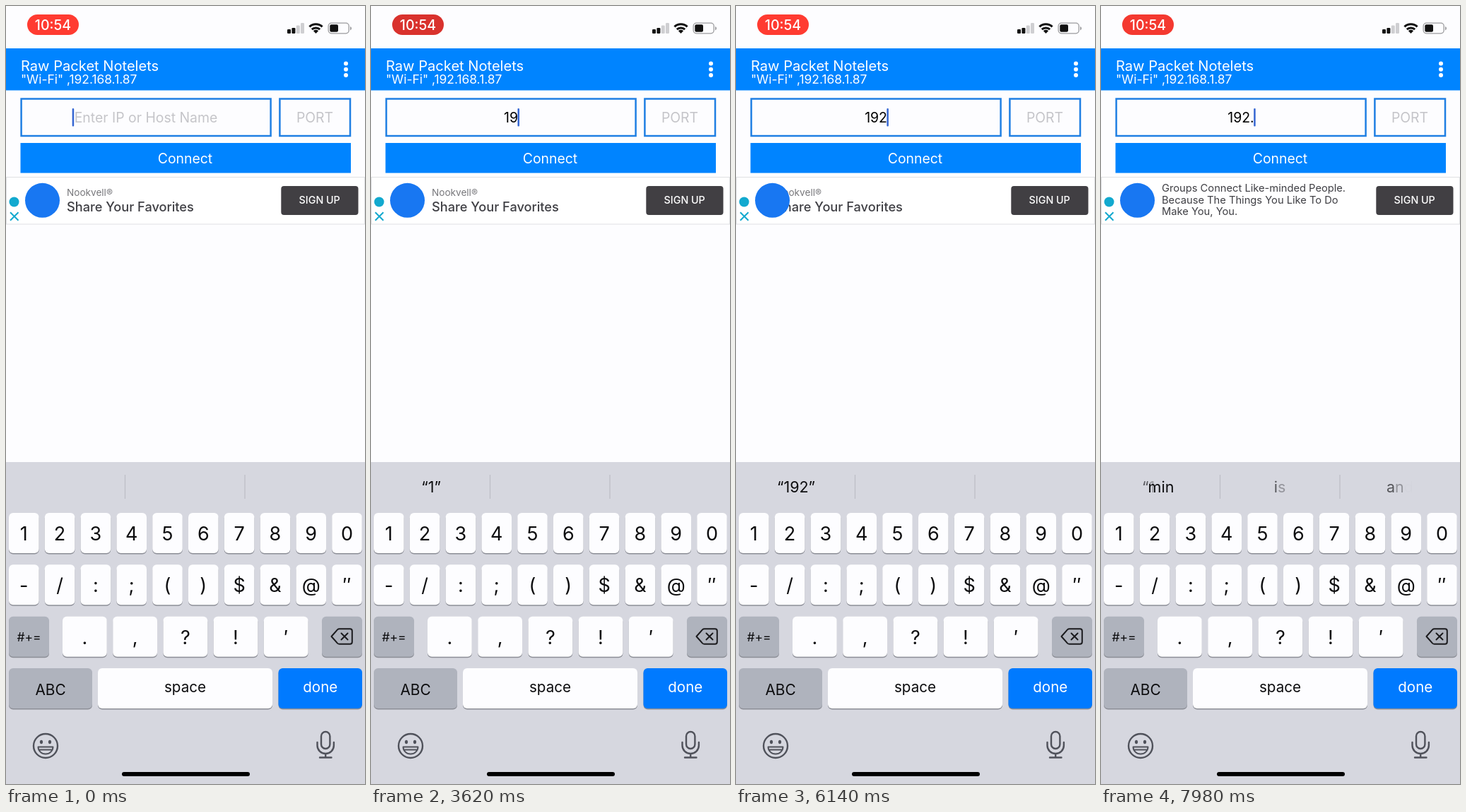
An HTML page that plays this animation: 508 px wide and 1102 px high, repeating every 8 s.

```html
<!DOCTYPE html>
<html lang="en">
<head>
<meta charset="utf-8">
<title>Connect screen</title>
<style>
  html, body { margin: 0; width: 100%; height: 100%; overflow: hidden; background: #fdfdff; }
  svg { display: block; width: 508px; height: 1102px; }
  text { font-family: Inter, "Liberation Sans", sans-serif; white-space: pre; }
  .mid { text-anchor: middle; }
  .field { fill: none; stroke: #1f7fe3; stroke-width: 2.5; }
  .hint { fill: #c5c5c9; }
  .line { fill: none; stroke: #50525b; stroke-width: 2.4; stroke-linecap: round; stroke-linejoin: round; }
  #popup { filter: drop-shadow(0 1px 2px rgba(0, 0, 0, .3)); }
</style>
</head>
<body>
<svg viewBox="0 0 508 1102">
  <rect width="508" height="1102" fill="#fdfdff"/>

  <!-- status bar -->
  <rect id="pill" x="30" y="12" width="73" height="29" rx="14.5"/>
  <text class="mid" x="66.5" y="33.5" font-size="19.6" font-weight="500" fill="#fff">10:54</text>
  <g fill="#111">
    <rect x="398" y="33" width="5" height="6" rx="1.2"/>
    <rect x="404.4" y="31" width="5" height="8" rx="1.2"/>
    <g fill="#cfcfd2">
      <rect x="410.8" y="27.5" width="5" height="11.5" rx="1.2"/>
      <rect x="417" y="24" width="5" height="15" rx="1.2"/>
    </g>
    <path d="M438.5 39l-3.6-3.7a5.2 5.2 0 0 1 7.2 0z"/>
    <g fill="none" stroke="#111" stroke-width="3">
      <path d="M429.4 29.4a13.2 13.2 0 0 1 18.2 0"/>
      <path d="M432.8 33.2a8.4 8.4 0 0 1 11.4 0"/>
    </g>
    <rect x="458.3" y="26.3" width="11.7" height="10.4" rx="2"/>
    <path d="M487 29q2 .8 2 2.7t-2 2.7z" fill="#9a9a9d"/>
  </g>
  <rect x="456.2" y="24.2" width="29" height="14.6" rx="4.2" fill="none" stroke="#9a9a9d" stroke-width="1.3"/>

  <!-- header and form -->
  <rect y="60" width="508" height="59.5" fill="#0084ff"/>
  <g fill="#fff">
    <text x="21" y="91.5" font-size="20.1">Raw Packet Notelets</text>
    <text x="21" y="110" font-size="17.4">"Wi-Fi" ,192.168.1.87</text>
    <circle cx="481" cy="81.5" r="3"/><circle cx="481" cy="89.8" r="3"/><circle cx="481" cy="98.1" r="3"/>
  </g>
  <rect class="field" x="21.6" y="131.5" width="353" height="52.5"/>
  <rect class="field" x="387.4" y="131.5" width="99.6" height="52.5"/>
  <rect x="20.5" y="194" width="467.5" height="42.5" fill="#0084ff"/>
  <g class="mid" font-size="19.4">
    <text id="entry" x="198" y="164.7"></text>
    <text class="hint" x="437" y="164.7">PORT</text>
    <text x="253.5" y="222.7" fill="#fff">Connect</text>
  </g>
  <rect id="caret" y="145" width="2.5" height="25.5" rx="1" fill="#3566d2"/>

  <!-- ad -->
  <rect x=".5" y="242.5" width="507" height="66.5" fill="#fff" stroke="#dfe0e3"/>
  <g id="slides" fill="#3f3f44">
    <text x="86" y="269" font-size="13.6" fill="#77777b">Nookvell®</text>
    <text x="86" y="290.5" font-size="18.2" font-weight="500">Share Your Favorites</text>
    <g font-size="14.7">
      <text x="594" y="263.3">Groups Connect Like-minded People.</text>
      <text x="594" y="279.7">Because The Things You Like To Do</text>
      <text x="594" y="296">Make You, You.</text>
    </g>
  </g>
  <circle cx="51.5" cy="275.3" r="24.5" fill="#1877f2"/>
  <circle cx="11.5" cy="277.5" r="7" fill="#12a9cf"/>
  <path d="M6 292.3l11.5 11.5m0-11.5l-11.5 11.5" stroke="#12a9cf" stroke-width="2"/>
  <rect x="389.3" y="255" width="109.2" height="41" rx="4" fill="#413f43"/>
  <text class="mid" x="443.7" y="279.6" font-size="14.3" font-weight="500" fill="#fff">SIGN UP</text>

  <!-- keyboard -->
  <rect y="646" width="508" height="456" fill="#d6d7df"/>
  <path d="M168.5 664v34M338 664v34" stroke="#bcbdc5" stroke-width="1.2"/>
  <g id="bar" class="mid" font-size="21.5" fill="#0c0c0e"></g>
  <g id="keys" class="mid" fill="#0c0c0e"></g>
  <g fill="none" stroke="#1b1b1e" stroke-width="2" stroke-linejoin="round" stroke-linecap="round">
    <path d="M460.5 893l8.5-9.6q1.2-1.2 2.8-1.2h15q3 0 3 3v15.600q0 3-3 3h-15q-1.600 0-2.800-1.200z"/>
    <path d="M474.500 888.500l9 9m0-9l-9 9"/>
  </g>
  <g class="line">
    <circle cx="56" cy="1048" r="17"/>
    <path d="M45.500 1049.500h21a10.500 10 0 0 1-21 0zM47.500 1053.500h17" stroke-width="1.900"/>
    <rect x="446" y="1028" width="12.400" height="24" rx="6.200"/>
    <path d="M440.500 1043v4.500a11.700 11.500 0 0 0 23.400 0v-4.500M452.200 1059v5.500M444 1064.500h16.500"/>
  </g>
  <ellipse cx="50" cy="1042.500" rx="2.100" ry="2.800" fill="#50525b"/>
  <ellipse cx="62" cy="1042.500" rx="2.100" ry="2.800" fill="#50525b"/>
  <rect x="164" y="1085" width="181" height="6" rx="3"/>
  <g id="popup" class="mid"><path fill="#fdfdff"/><text font-size="48" fill="#0c0c0e"></text></g>
</svg>

<script>
const LOOP = 8000, PULSE = 1020, BLINK = 900, HOLD = 110;
const $ = id => document.getElementById(id);
const clamp = v => Math.min(1, Math.max(0, v));

function add(parent, tag, attrs, text = '') {
  const node = document.createElementNS('http://www.w3.org/2000/svg', tag);
  for (const name in attrs) node.setAttribute(name, attrs[name]);
  node.textContent = text;
  parent.append(node);
  return node;
}

// Keys
const keyBoxes = {};
function addKey(label, x, y, w, { fill = '#fdfdff', ink = '#0c0c0e', size = 27, base = 39 } = {}) {
  add($('keys'), 'rect', { x, y: y + 1.5, width: w, height: 57, rx: 6, fill: '#8c8e96' });
  add($('keys'), 'rect', { x, y, width: w, height: 57, rx: 6, fill });
  add($('keys'), 'text', { x: x + w / 2, y: y + base, 'font-size': size, fill: ink }, label);
  keyBoxes[label] = { x, y, w };
}
const gray = '#afb3bd';
[...'1234567890'].forEach((c, i) => addKey(c, 4 + 50.8 * i, 718, 42.6));
[...'-/:;()$&@″'].forEach((c, i) => addKey(c, 4 + 50.8 * i, 791.3, 42.6));
[...'.,?!′'].forEach((c, i) => addKey(c, 80 + 71.2 * i, 864.7, 62.8));
addKey('#+=', 4, 864.7, 57, { fill: gray, size: 17.5, base: 35 });
addKey('', 447, 864.7, 57, { fill: gray });
addKey('ABC', 4, 938, 118, { fill: gray, size: 20.8, base: 37.5 });
addKey('space', 130, 938, 247, { size: 20.6, base: 34 });
addKey('done', 385.5, 938, 118.5, { fill: '#007aff', ink: '#fff', size: 20.5, base: 34 });

// Typing: each key pops up for HOLD ms, then its character is entered.
const strokes = [['1', 1950], ['9', 3600], ['2', 4810], ['.', 7780]];

// Suggestions per slot: centre, then [start, word]
const slots = [
  { x: 85, words: [[2025, '“1”'], [3700, '“19”'], [4900, '“192”'], [7850, 'min']] },
  { x: 253, words: [[7930, 'is']] },
  { x: 423, words: [[7930, 'and']] }
];
const wordNodes = slots.flatMap(({ x, words }) => words.map(([start, word], i) => {
  const text = add($('bar'), 'text', { x, y: 688.5 });
  const letters = [...word].map(c => add(text, 'tspan', {}, c));
  return { text, letters, start, end: words[i + 1] ? words[i + 1][0] : Infinity };
}));

function drawSuggestions(t) {
  for (const { text, letters, start, end } of wordNodes) {
    text.style.display = t >= start && t < end + 250 ? '' : 'none';
    letters.forEach((letter, i) => {
      const shown = clamp((t - start - i * 25) / 80);
      const gone = clamp((t - end - (letters.length - 1 - i) * 25) / 80);
      letter.setAttribute('fill-opacity', shown * (1 - gone));
    });
  }
}

function drawPopup(t) {
  const stroke = strokes.find(([, at]) => t >= at - HOLD && t < at);
  $('popup').style.display = stroke ? '' : 'none';
  if (!stroke) return;
  const { x, y, w } = keyBoxes[stroke[0]], r = x + w;
  const left = Math.max(3, x - 17.5), right = left + w + 35;
  const [shape, label] = $('popup').children;
  shape.setAttribute('d', `M${left + 12} ${y - 88}H${right - 12}q12 0 12 12V${y - 26}
    C${right} ${y - 8} ${r} ${y - 10} ${r} ${y + 10}V${y + 51}q0 6 -6 6H${x + 6}q-6 0 -6 -6V${y + 10}
    C${x} ${y - 10} ${left} ${y - 8} ${left} ${y - 26}V${y - 76}q0 -12 12 -12z`);
  label.setAttribute('x', (left + right) / 2);
  label.setAttribute('y', y - 32);
  label.textContent = stroke[0];
}

function drawEntry(t) {
  const typed = strokes.filter(([, at]) => t >= at);
  const value = typed.map(([c]) => c).join('');
  const entry = $('entry');
  const shown = value || 'Enter IP or Host Name';
  if (entry.textContent !== shown) entry.textContent = shown;
  entry.setAttribute('class', value ? '' : 'hint');
  const half = entry.getComputedTextLength() / 2;
  $('caret').setAttribute('x', value ? 198 + half - .5 : 198 - half - 3);

  const phase = (t - (typed.length ? typed[typed.length - 1][1] : 0)) % BLINK;
  const opacity = phase < 680 ? 1 - clamp((phase - 440) / 150) : clamp((phase - 740) / 160);
  $('caret').setAttribute('opacity', opacity);
}

function draw(t) {
  const glow = (1 + Math.cos(t / PULSE * 2 * Math.PI)) / 2;
  $('pill').setAttribute('fill', `rgb(${216 + 39 * glow}, ${50 + 9 * glow}, ${45 + 4 * glow})`);
  const slide = (1 - Math.cos(Math.PI * clamp((t - 5910) / 1480))) / 2;
  $('slides').setAttribute('transform', `translate(${-508 * slide} 0)`);
  drawEntry(t);
  drawSuggestions(t);
  drawPopup(t);
}

const begin = performance.now();
function tick() {
  draw((performance.now() - begin) % LOOP);
  requestAnimationFrame(tick);
}
tick();
</script>
</body>
</html>
```
